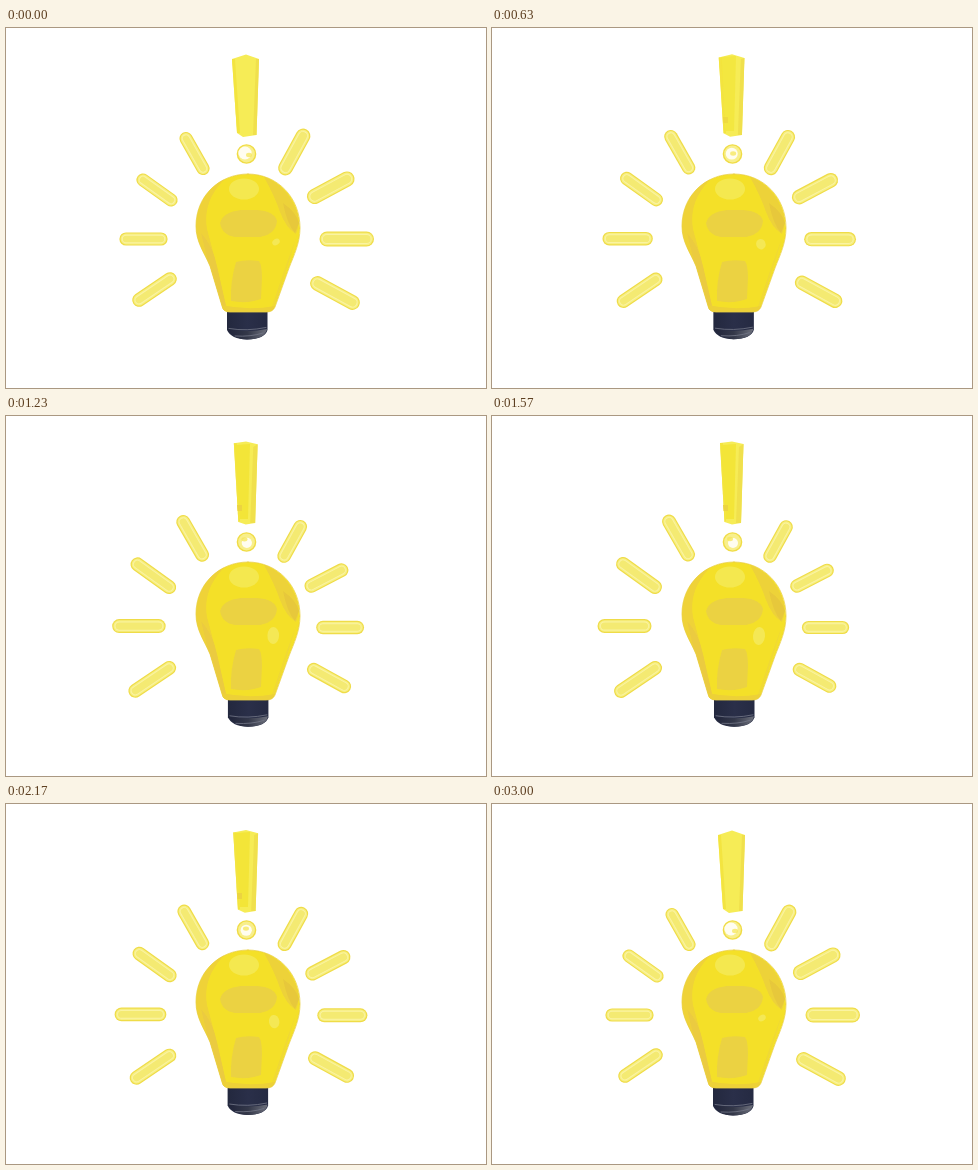
An HTML page with a canvas for the animation above (3030 ms loop, 480x360 px).

```html
<!DOCTYPE html>
<html lang="en">
<head>
<meta charset="utf-8">
<title>Light bulb</title>
<style>
html, body { margin: 0; width: 100%; height: 100%; overflow: hidden; background: #fff; }
canvas { display: block; }
</style>
</head>
<body>
<canvas id="stage" width="480" height="360"></canvas>
<script>
const ctx = document.getElementById('stage').getContext('2d');
const LOOP = 3030;
const mix = (a, b, k) => a + (b - a) * k;
const blend = (a, b, k) => a.map((v, i) => mix(v, b[i], k));

// Each ray: x1, y1, x2, y2, radius at both ends of the sway.
const rays = [
  [[180, 110.5, 197, 140.5, 6.6], [177, 105.5, 196, 138.5, 7]],
  [[137, 152, 165, 172, 6.6], [131, 148, 163, 171, 7]],
  [[120, 211, 155, 211, 6.6], [112.5, 210, 152.5, 210, 7]],
  [[133, 272, 164, 251, 6.8], [129, 275, 163, 252, 7]],
  [[279.5, 140, 297, 108, 7.4], [278, 140, 294, 111, 6.8]],
  [[308.5, 168.5, 341, 151, 7.6], [305, 170, 335, 154.5, 6.8]],
  [[321, 211, 360.5, 211, 7.5], [316.5, 211.5, 350.5, 211.5, 6.6]],
  [[311.5, 255.5, 346.5, 274.5, 7.4], [307.5, 253.5, 337.5, 270, 6.8]]
];

function fill(path, color) {
  ctx.fillStyle = color;
  ctx.fill(new Path2D(path));
}

function poly(points, color) {
  ctx.beginPath();
  for (let i = 0; i < points.length; i += 2) ctx.lineTo(points[i], points[i + 1]);
  ctx.closePath();
  ctx.fillStyle = color;
  ctx.fill();
}

function oval(x, y, rx, ry, color, turn = 0) {
  ctx.beginPath();
  ctx.ellipse(x, y, rx, ry, turn, 0, Math.PI * 2);
  ctx.fillStyle = color;
  ctx.fill();
}

function ramp(x1, y1, x2, y2, ...colors) {
  const g = ctx.createLinearGradient(x1, y1, x2, y2);
  colors.forEach((c, i) => g.addColorStop(i / (colors.length - 1), c));
  return g;
}

function ray([x1, y1, x2, y2, r]) {
  const layers = [[r, '#efdc48'], [r - 1.2, '#f7ef82'], [r - 2.4, '#faf3a2'], [r - 3.4, '#f4ea72']];
  ctx.lineCap = 'round';
  for (const [half, color] of layers) {
    ctx.beginPath();
    ctx.moveTo(x1, y1);
    ctx.lineTo(x2, y2);
    ctx.lineWidth = half * 2;
    ctx.strokeStyle = color;
    ctx.stroke();
  }
}

function mark(k) {
  const body = blend(
    [226, 31, 240, 26.5, 253, 31, 250.5, 107, 237, 109, 231, 105],
    [228, 27, 240, 25.5, 251.5, 28, 249, 107, 240, 108.5, 232.5, 106], k);
  poly(body, '#f6ec56');
  const x = mix(250, 247, k);
  poly([x, 31, body[4], body[5], body[6], body[7], x - 3, 107], '#f0e04c');
  poly([body[0], body[1], body[0] + 3, body[1], 234, 105, body[10], body[11]], '#f3e440');
  if (k > .05) {
    ctx.globalAlpha = Math.min(1, k * 2);
    poly([229, 29, 244, 28, 242, 103, 234, 103], '#f3e538');
    poly([231, 89, 236, 89, 236, 95, 231.5, 95], '#ecd440');
    ctx.globalAlpha = 1;
  }
}

function dot(k) {
  oval(240.5, 126, 9.8, 9.8, '#f0dc45');
  oval(240.5, 126, 8.4, 8.4, '#f8ef8c');
  oval(mix(239, 241, k), mix(125, 127, k), mix(6.6, 5, k), mix(6.4, 5, k), '#fffdf0');
  ctx.globalAlpha = .75;
  oval(mix(243, 238, k), mix(127, 123, k), 3, 2.2, '#f5e65a');
  ctx.globalAlpha = 1;
}

function base(k) {
  ctx.save();
  ctx.translate(mix(0, 1, k), mix(0, -.7, k));
  fill('M221 283H261.5V302Q259 311 241 311.5Q225 311 221 302Z',
    ramp(221, 0, 262, 0, '#23283e', '#2a2f49', '#252a42'));
  fill('M222 301Q241 305 261 301Q259 311 241 311.5Q227 311 222 301Z',
    ramp(222, 0, 261, 0, '#20243a', '#343849', '#6d707c'));
  ctx.strokeStyle = '#747888';
  ctx.lineWidth = .8;
  ctx.stroke(new Path2D('M223 300.5Q241 303.5 260 299.5M229 308Q245 309 257 305'));
  ctx.restore();
}

const glass = 'M242 146C271 146 294 169 294 200C294 215 288 227 283 240L269 279' +
  'Q267 284 260 284H224Q217 284 216 278L204 238C198 224 190 214 190 198C190 168 213 146 242 146Z';

function bulb(k) {
  ctx.save();
  ctx.clip(new Path2D(glass));
  fill(glass, '#f4e028');
  fill('M190 200Q190 165 222 148Q196 171 201 201Q211 237 221 284H212L188 215Z', '#efd238');
  fill('M195 205Q207 218 211 238L221 282H216L203 238Z', '#ebcb40');
  fill('M258 149Q278 156 288 177Q296 193 290 206Q280 200 274 184Q269 169 258 149Z', '#edd239');
  fill('M277 175Q290 184 293 195L289 205Q281 196 277 175Z', '#e7c83b');
  fill('M291 207Q285 228 268 280L264 284L280 237Z', '#f0d934');
  fill('M216 277Q242 283 269 278L266 285H218Z', '#edd137');
  ctx.restore();
  ctx.strokeStyle = '#ead044';
  ctx.lineWidth = .8;
  ctx.stroke(new Path2D(glass));

  oval(238, 161, 15, 10.5, '#f4e84f');
  fill('M214 195Q217 184 235 182H251Q268 183 271 193Q270 206 254 209H229Q216 207 214 195Z', '#ebd242');
  fill('M230 234Q240 231 253 233Q256 237 256 250L255 271Q242 276 225 273Q224 254 230 234Z', '#ebd242');
  oval(mix(270, 267, k), mix(214, 220, k), mix(4, 6, k), mix(3, 9, k), '#f4e855', mix(-.6, .1, k));
}

function draw(now) {
  const k = (1 - Math.cos(2 * Math.PI * (now % LOOP) / LOOP)) / 2;
  ctx.fillStyle = '#fff';
  ctx.fillRect(0, 0, 480, 360);
  for (const [a, b] of rays) ray(blend(a, b, k));
  mark(k);
  dot(k);
  base(k);
  bulb(k);
}

let start;
function tick(now) {
  start ??= now;
  draw(now - start);
  requestAnimationFrame(tick);
}
draw(0);
requestAnimationFrame(tick);
</script>
</body>
</html>
```
